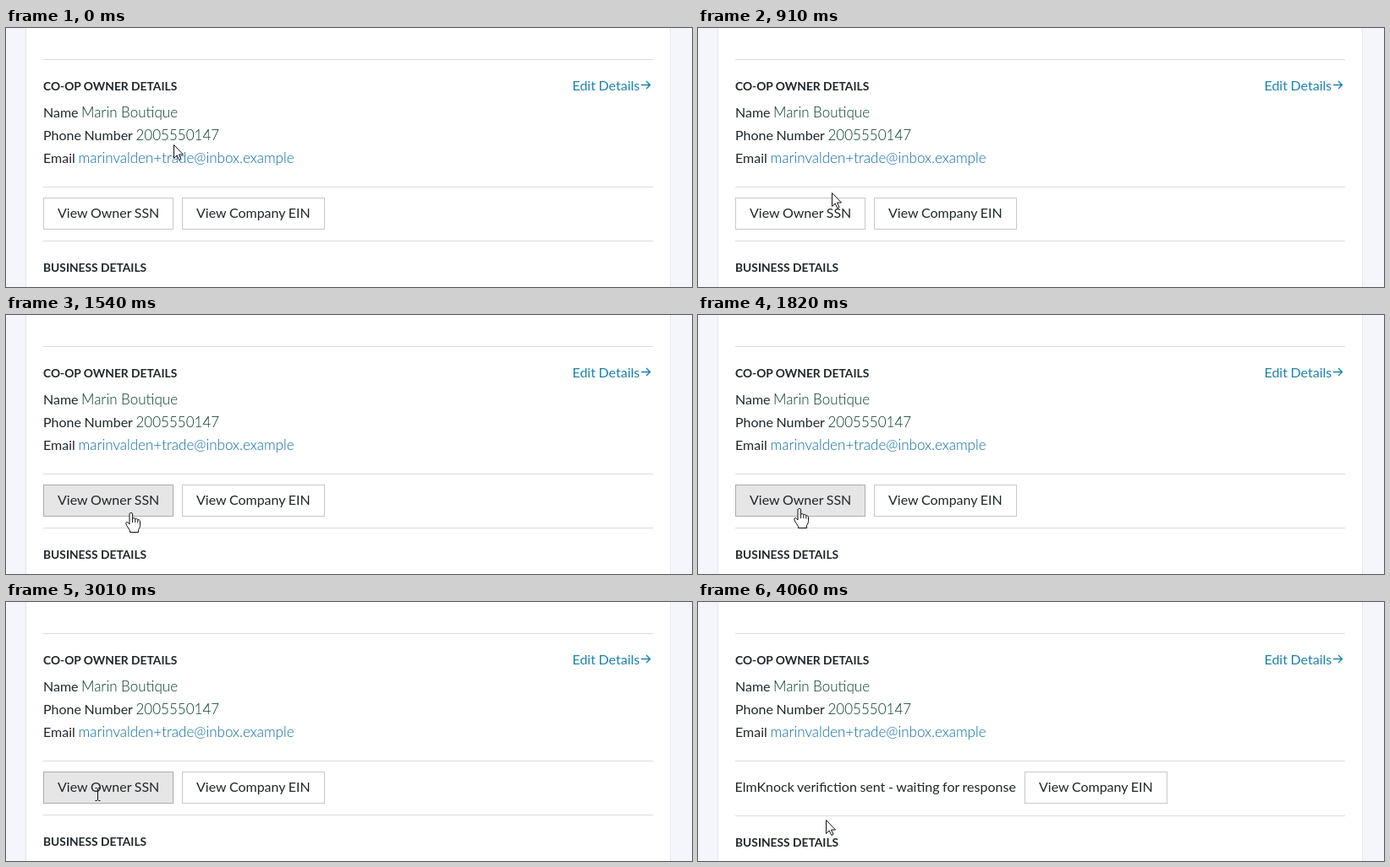
These frames come from a looping animation (811 px wide and 307 px high, 8000 ms). An HTML page:

```html
<!DOCTYPE html>
<html lang="en">
<head>
<meta charset="utf-8">
<title>Owner details</title>
<style>
  html, body { margin: 0; width: 100%; height: 100%; overflow: hidden; background: #f5f6fb; }
  svg { display: block; width: 811px; height: 307px; }
  text { font: 400 16px Lato, "Open Sans", sans-serif; fill: #20272b; word-spacing: -.5px; white-space: pre; }
  .head { font-size: 13.8px; font-weight: 700; word-spacing: 0; }
  .value { font-size: 17px; font-weight: 300; fill: #023a22; word-spacing: 0; }
  .link { fill: #1b83b0; }
  .value.link { fill: #066aa6; }
  .rule { fill: #dcdcdc; }
  .btn { fill: #fff; stroke: #c8c8c8; }
  .btn.hover { fill: #e6e6e6; stroke: #adadad; }
  #cursor path { fill: #fff; stroke: #111; stroke-linejoin: round; }
  #cursor .line { fill: none; }
  .hidden { display: none; }
</style>
</head>
<body>
<svg viewBox="0 0 811 307">
  <rect x="23" width="763" height="307" fill="#e6e8ee"/>
  <rect x="24" width="761" height="307" fill="#fff"/>
  <rect class="rule" x="44" y="37" width="721" height="1"/>
  <rect class="rule" x="44" y="188" width="721" height="1"/>

  <text class="head" x="44" y="74">CO-OP OWNER DETAILS</text>
  <text class="link" x="669.5" y="74">Edit Details</text>
  <path d="M751 67.5H761.5M757 63L761.5 67.5L757 72" fill="none" stroke="#1b83b0" stroke-width="1.4"/>

  <text x="44" y="106">Name</text>
  <text class="value" data-cursor="beam" x="89" y="106">Marin Boutique</text>
  <text x="44" y="133">Phone Number</text>
  <text class="value" data-cursor="beam" x="153.5" y="133">2005550147</text>
  <text x="44" y="160">Email</text>
  <text class="value link" data-cursor="hand" x="85.5" y="160">marinvalden+trade@inbox.example</text>

  <g id="ownerButton">
    <rect id="ownerBox" class="btn" data-cursor="hand" x="44.5" y="201.5" width="153" height="37"/>
    <text x="61" y="225">View Owner SSN</text>
  </g>
  <text id="prompt" x="43.5" y="225">ElmKnock verifiction sent - waiting for response</text>
  <g id="companyButton">
    <rect class="btn" x="208.5" y="201.5" width="168" height="37"/>
    <text x="225" y="225">View Company EIN</text>
  </g>
  <g id="lower">
    <rect class="rule" x="44" y="252" width="721" height="1"/>
    <text class="head" x="44" y="289">BUSINESS DETAILS</text>
  </g>

  <g id="cursor">
    <path id="arrow" d="M.5 .5V16.5L4.2 13L6.8 18.5L9 17.5L6.5 12H11.5Z"/>
    <g id="hand">
      <path d="M-2 12V1.8Q-2 .5 -.2 .5Q1.6 .5 1.6 1.8V7.6Q1.8 6.4 3.2 6.6Q4.8 6.8 4.8 8.2Q5.2 7.2 6.5 7.5Q7.8 7.8 7.8 9.2Q8.4 8.4 9.4 8.9Q10.5 9.4 10.5 10.8V15.5Q10.5 18 8.5 20.5V23.5H-1.5V21.5L-5.4 15.3Q-7 12.6 -5.6 11.7Q-4.3 11 -3.2 12.4L-2 14Z"/>
      <path class="line" d="M1.6 7.6V12M4.8 8.2V12M7.8 9.2V12.5"/>
    </g>
    <path id="beam" class="line" d="M-1.5 -6.5H.5L1.5 -5.5L2.5 -6.5H4.5M1.5 -5.5V7.5M-1.5 8.5H.5L1.5 7.5L2.5 8.5H4.5"/>
  </g>
</svg>
<script>
const LOOP = 8000, STEP = 70;
const BEAM_AT = 3010, SENT_AT = 3080, ARROW_AT = 3640;

// Pointer moves: start and end in ms, then where it arrives
const home = { x: 198, y: 138 };
const moves = [
  { from: 0, to: 350, x: 188, y: 85 },
  { from: 560, to: 910, x: 158, y: 195 },
  { from: 910, to: 1330, x: 156, y: 225 },
  { from: 1400, to: 1540, x: 148, y: 234 },
  { from: 1540, to: 2170, x: 107, y: 227 },
  { from: 3360, to: 3570, x: 118, y: 229 },
  { from: 3570, to: 4060, x: 151, y: 258 }
];

const el = id => document.getElementById(id);
const show = (id, on) => el(id).classList.toggle("hidden", !on);
const shift = (id, x, y) => el(id).setAttribute("transform", `translate(${x} ${y})`);
const easeOut = k => k * (2 - k);
const targets = [...document.querySelectorAll("[data-cursor]")];

function pointerAt(t) {
  let { x, y } = home;
  for (const m of moves) {
    const k = easeOut(Math.min(1, Math.max(0, (t - m.from) / (m.to - m.from))));
    x += (m.x - x) * k;
    y += (m.y - y) * k;
  }
  return { x: Math.round(x), y: Math.round(y) };
}

function covers(node, { x, y }) {
  const b = node.getBBox();
  return x >= b.x && x < b.x + b.width && y >= b.y && y < b.y + b.height;
}

function cursorKind(t, target) {
  if (t >= ARROW_AT) return "arrow";
  if (t >= BEAM_AT) return "beam";
  return target ? target.dataset.cursor : "arrow";
}

function render(now) {
  const t = Math.floor(now % LOOP / STEP) * STEP;
  const sent = t >= SENT_AT;
  const p = pointerAt(t);
  const target = targets.find(node => covers(node, p));
  const kind = cursorKind(t, target);

  show("ownerButton", !sent);
  show("prompt", sent);
  el("ownerBox").classList.toggle("hover", target === el("ownerBox"));
  shift("companyButton", sent ? 178 : 0, 0);
  shift("lower", 0, sent ? 1 : 0);

  for (const id of ["arrow", "hand", "beam"]) show(id, id === kind);
  shift("cursor", p.x, p.y);
}

const start = performance.now();
function tick() {
  render(performance.now() - start);
  requestAnimationFrame(tick);
}
tick();
</script>
</body>
</html>
```
